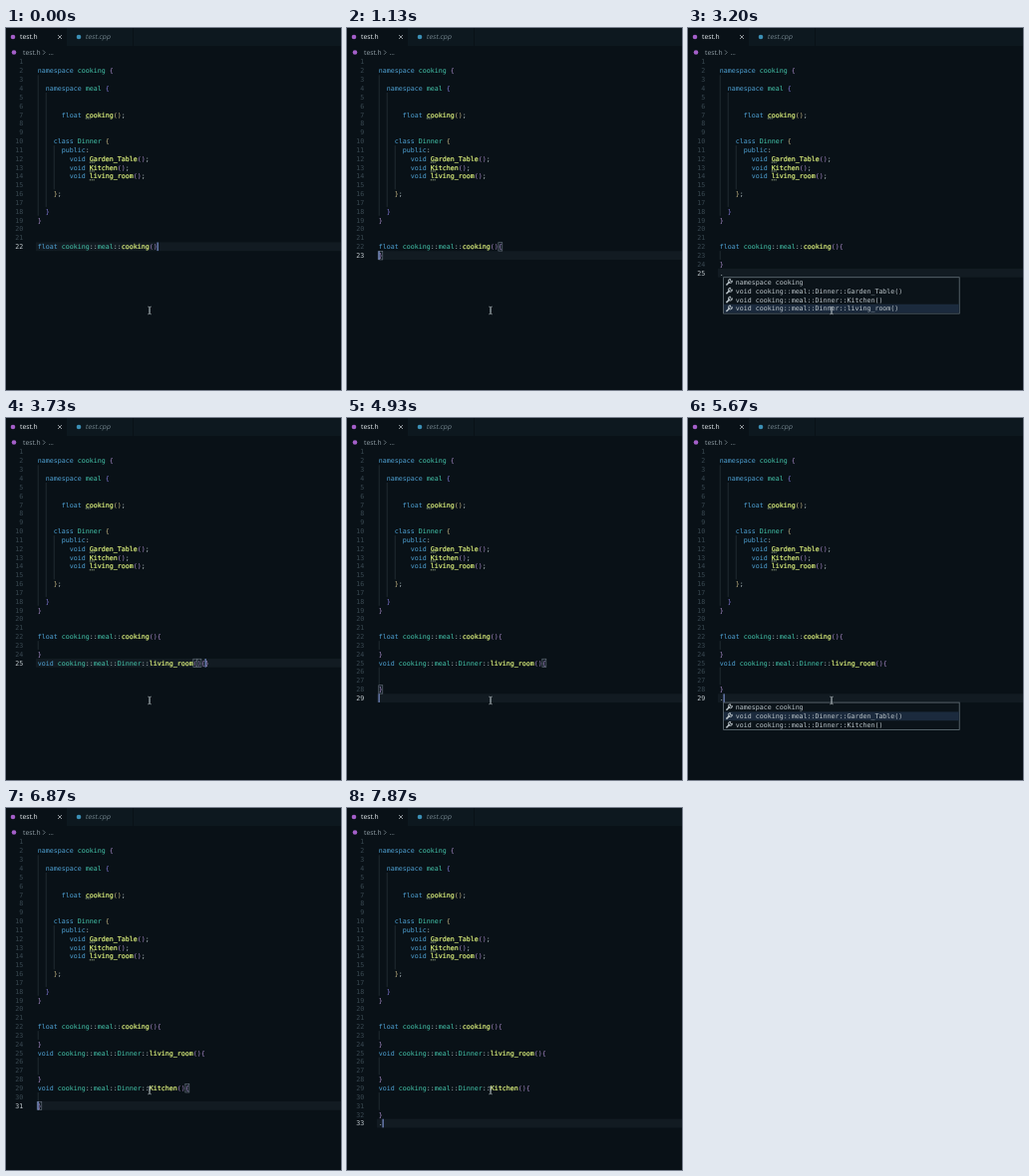
An HTML page for the animation above (8 s loop, 336 by 364 pixels).

```html
<!DOCTYPE html>
<html lang="en">
<head>
<meta charset="utf-8">
<title>Code editor</title>
<style>
  html, body { margin: 0; width: 336px; height: 364px; overflow: hidden; background: #091117; }
  svg { display: block; text-rendering: geometricPrecision; }
  .code text { font: 6.644px "DejaVu Sans Mono", monospace; white-space: pre; }
  .ui text { font: 6.7px "Noto Sans", sans-serif; }
  .key { fill: #4fa3d6; }
  .name { fill: #45c9ae; }
  .func { fill: #dcf07c; stroke: #dcf07c; stroke-width: .2; }
  .mark { fill: #b3c0c4; }
  .depth0 { fill: #a88bc8; }
  .depth1 { fill: #837ad8; }
  .depth2 { fill: #c4b684; }
  .num { fill: #3a4952; text-anchor: end; }
  .num.on { fill: #c4ccd0; }
  .item { fill: #bcc5ca; }
</style>
</head>
<body>
<svg width="336" height="364" viewBox="0 0 336 364">
  <rect width="336" height="364" fill="#091117"/>
  <g class="ui">
    <rect x="61" width="275" height="18" fill="#0d181f"/>
    <path d="M127.5 0v18" stroke="#091117"/>
    <circle cx="7" cy="9" r="2.3" fill="#a45fc9"/>
    <text x="14" y="11.4" fill="#dfe5e8">test.h</text>
    <path d="M52 7l4 4M56 7l-4 4" stroke="#c4ccd0" stroke-width=".7"/>
    <circle cx="73" cy="9" r="2.3" fill="#3b8fb5"/>
    <text transform="translate(79.5 11.4) skewX(-12)" fill="#71828b">test.cpp</text>
    <circle cx="8" cy="24.5" r="2.3" fill="#a45fc9"/>
    <text x="17" y="26.9" fill="#8c99a0">test.h</text>
    <path d="M37 22.4l2.2 2.2-2.2 2.2" fill="none" stroke="#8c99a0" stroke-width=".7"/>
    <text x="42.5" y="26.9" fill="#8c99a0">...</text>
  </g>
  <g class="code" id="editor"></g>
  <g class="code" id="popup"></g>
  <path d="M142.3 280.2q1.7 0 1.7 1v5.6q0 1-1.7 1M145.7 280.2q-1.7 0-1.7 1v5.6q0 1 1.7 1" fill="none" stroke="#b4bcc0" stroke-width=".7"/>
</svg>
<script>
const LOOP = 8000, BLINK = 500, LEFT = 31.8, CHAR = 4, PITCH = 8.84;
const editor = document.getElementById('editor');
const popup = document.getElementById('popup');
const lineY = n => 219.7 + (n - 22) * PITCH;
const colX = c => LEFT + c * CHAR;

const SOURCE = `
namespace cooking {

  namespace meal {


      float cooking();


    class Dinner {
      public:
        void Garden_Table();
        void Kitchen();
        void living_room();

    };

  }
}


float cooking::meal::cooking()`.split('\n');

const method = name => `void cooking::meal::Dinner::${name}()`;
const CHOICES = ['namespace cooking', ...['Garden_Table', 'Kitchen', 'living_room'].map(method)];

const type = (text, step = 1) => s => {
  const line = s.lines[s.row];
  s.lines[s.row] = line.slice(0, s.col) + text + line.slice(s.col);
  s.col += step;
};
const enter = s => {
  const line = s.lines[s.row];
  s.lines.splice(s.row, 1, line.slice(0, s.col), line.slice(s.col));
  s.row++;
  s.col = 0;
};
const toEnd = s => { s.col = s.lines[s.row].length; };
const open = count => s => { s.items = CHOICES.slice(0, count); s.pick = 0; };
const down = s => { s.pick++; };
const accept = s => {
  s.lines[s.row] = s.items[s.pick];
  s.items = [];
  toEnd(s);
};
// Outline the bracket pair next to the caret.
const match = s => {
  s.pair = [];
  const line = s.lines[s.row];
  const close = [s.col, s.col - 1].find(c => line[c] === ')' || line[c] === '}');
  if (close === undefined) return;
  const opener = line[close] === ')' ? '(' : '{';
  for (let row = s.row; row >= 0; row--) {
    const col = s.lines[row].lastIndexOf(opener);
    if (col < 0) continue;
    s.pair = [[row, col], [s.row, close]];
    return;
  }
};
const enterMatch = s => { enter(s); match(s); };

const EVENTS = [
  [270, match],
  [870, type('{}')], [930, match], [1130, enterMatch], [1270, enterMatch],
  [1600, toEnd], [1870, enter], [2070, match],
  [2270, type('.')], [2400, open(4)], [2600, down], [2670, down], [2800, down],
  [3270, accept], [3330, match],
  [3730, type('{}')], [3930, match], [4000, enterMatch], [4130, enterMatch], [4330, enterMatch],
  [4530, toEnd], [4930, enter], [5130, match],
  [5200, type('.')], [5400, open(3)], [5670, down], [5800, down],
  [6000, accept], [6070, match],
  [6270, type('{}')], [6330, match], [6730, enterMatch], [6870, enterMatch], [7070, enterMatch],
  [7270, toEnd], [7530, enter], [7600, match], [7870, type('.')]
];

function stateAfter(count) {
  const s = { lines: [...SOURCE], row: 21, col: SOURCE[21].length, pair: [], items: [], pick: 0, moved: 30 };
  for (const [at, act] of EVENTS.slice(0, count)) {
    const { row, col } = s;
    act(s);
    if (s.row !== row || s.col !== col) s.moved = at;
  }
  return s;
}

const rect = (x, y, w, h, style) => `<rect x="${x}" y="${y}" width="${w}" height="${h}" ${style}/>`;

function kind(word, next) {
  if (/^(namespace|float|class|public|void)$/.test(word)) return 'key';
  if (!/^\w/.test(word)) return 'mark';
  return next === '(' ? 'func' : 'name';
}

// Bracket colours follow the nesting depth across all lines.
function highlighter() {
  let depth = 0;
  const style = (word, next) => {
    if (/[({]/.test(word)) return `depth${depth++ % 3}`;
    if (/[)}]/.test(word)) return `depth${--depth % 3}`;
    return kind(word, next);
  };
  return line => [...line.matchAll(/\w+|[^\w\s]/g)].map(({ 0: word, index }) =>
    `<tspan x="${colX(index)}" class="${style(word, line[index + word.length])}">${word}</tspan>`).join('');
}

function guides(lines) {
  const openRows = [];
  return lines.map((line, row) => {
    let mark = '';
    if (line.includes('}') && openRows.length) {
      const from = openRows.pop() + 1;
      mark = rect(colX(line.search(/\S/)), lineY(from + 1) - PITCH / 2, .7, (row - from) * PITCH, 'fill="#2b363d"');
      if (line.includes('{')) return '';
    }
    if (line.includes('{') && !line.includes('}')) openRows.push(row);
    return mark;
  }).join('');
}

function drawLine(line, i, active, highlight) {
  const y = lineY(i + 1);
  const hint = i < 21 && line.match(/\w+(?=\(\))/);
  const dots = hint ? [0, 1.9, 3.8].map(dx =>
    rect(colX(hint.index) + dx, y + 3.3, 1, 1, 'fill="#b5c9a0"')).join('') : '';
  return `<text x="17.3" y="${y + 2.4}" class="num${active ? ' on' : ''}">${i + 1}</text>
    <text y="${y + 2.4}">${highlight(line)}</text>${dots}`;
}

function drawEditor(s, caretOn) {
  const y = lineY(s.row + 1);
  const highlight = highlighter();
  const band = rect(30, y - 4.3, 306, 8.8, 'fill="#121b22"');
  const boxes = s.pair.map(([row, col]) =>
    rect(colX(col), lineY(row + 1) - 4, CHAR, 8.4, 'fill="#111c23" stroke="#6f7886" stroke-width=".6"')).join('');
  const caret = caretOn ? rect(colX(s.col) - .2, y - 4.2, 1, 8.6, 'fill="#8ea6ee"') : '';
  editor.innerHTML = band + guides(s.lines) + boxes +
    s.lines.map((line, i) => drawLine(line, i, i === s.row, highlight)).join('') + caret;
}

function drawPopup({ items, pick, row }) {
  if (!items.length) { popup.innerHTML = ''; return; }
  const top = lineY(row + 1) + 4.5;
  const frame = rect(35.6, top, 236.6, items.length * PITCH + 1, 'fill="#0b1319" stroke="#66737b" stroke-width=".8"');
  popup.innerHTML = frame + items.map((item, i) => {
    const y = top + .3 + (i + .5) * PITCH;
    const bar = i === pick ? rect(36, y - PITCH / 2 + .2, 235.8, PITCH, 'fill="#1b2a3d"') : '';
    return `${bar}<g transform="translate(41.4 ${y})" fill="none" stroke="#bcc6cb">
      <path d="M-3 3L.5-.5" stroke-width="1.5"/><path d="M1.3-3A2 2 0 1 0 3-1.3L1.5-.8 .8-1.5z" stroke-width=".9"/></g>
      <text class="item" x="47.8" y="${y + 2.4}">${item}</text>`;
  }).join('');
}

let shown = '';
function render(time) {
  const count = EVENTS.filter(([at]) => at <= time).length;
  const state = stateAfter(count);
  const caretOn = Math.floor(Math.max(0, time - state.moved) / BLINK) % 2 === 0;
  const key = `${count} ${caretOn}`;
  if (key === shown) return;
  shown = key;
  drawEditor(state, caretOn);
  drawPopup(state);
}

const start = performance.now();
function tick() {
  render((performance.now() - start) % LOOP);
  requestAnimationFrame(tick);
}
tick();
</script>
</body>
</html>
```
